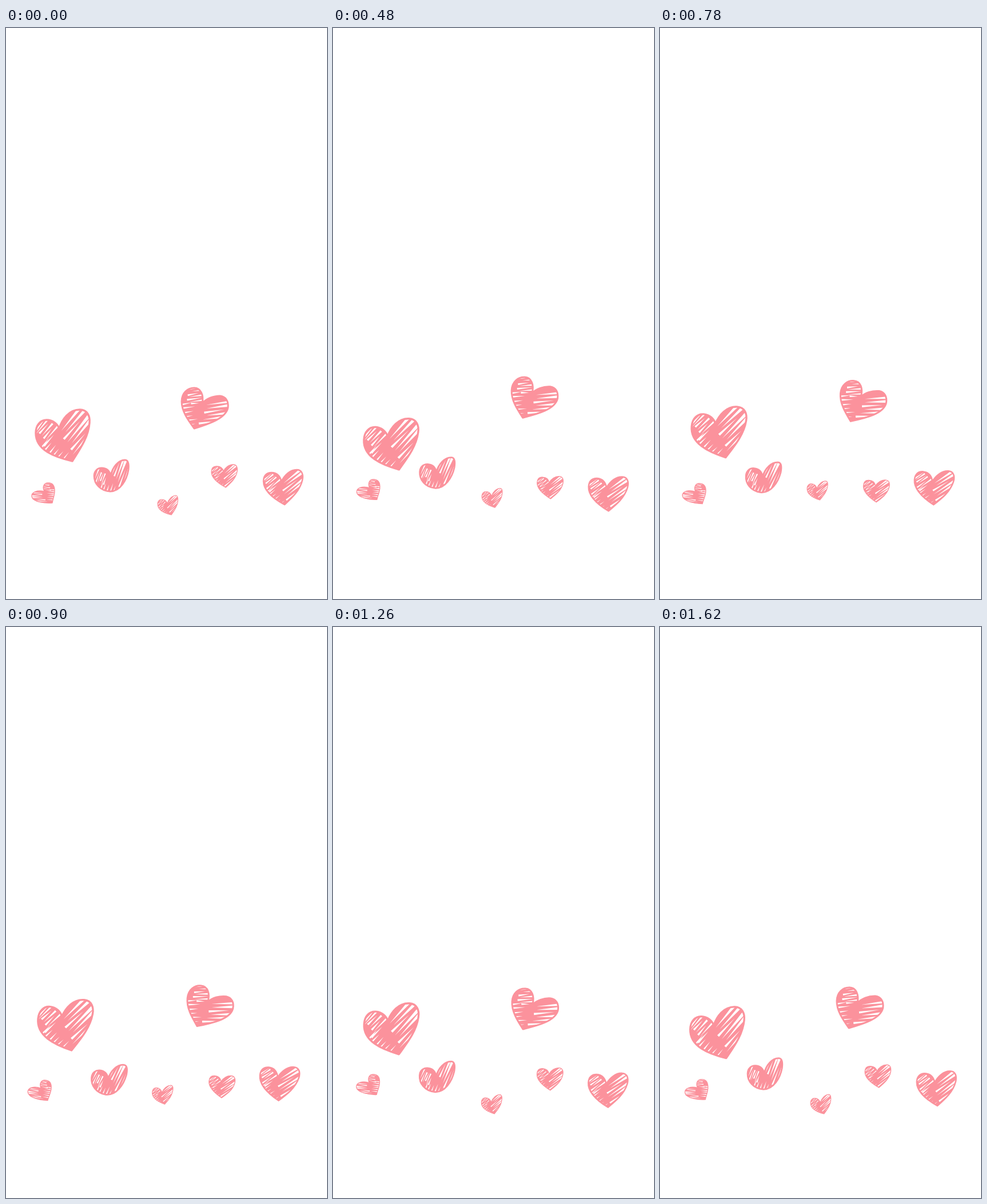
An HTML page with a canvas that plays this animation: 561x998 px, repeating every 1.65 s.

```html
<!DOCTYPE html>
<html lang="en">
<head>
<meta charset="utf-8">
<title>Floating hearts</title>
<style>
html, body { margin: 0; height: 100%; overflow: hidden; background: #fff; }
canvas { display: block; }
</style>
</head>
<body>
<canvas id="stage" width="561" height="998"></canvas>
<script>
const PINK = '#fb929c', LOOP = 1650, HALF = 25, TILT = 6 * Math.PI / 180;
const ctx = document.getElementById('stage').getContext('2d');

// hatch: stroke angle in degrees; drift: sideways travel; bob: [step, dy] corners over 50 steps
const hearts = [
  { x: 99, y: 711.5, r: 50, line: 3.4, hatch: -50, drift: 3.4,
    bob: [[0, 0], [12.5, 15.4], [25, -18.6], [50, 0]],
    d: 'M116 757C85 750 52 738 52 708C52 694 60 685 71 685C82 685 90 692 93 700C98 684 110 667 129 667C142 667 147 678 146 690C144 715 130 735 116 757Z' },
  { x: 347, y: 665, r: 44, line: 3, hatch: -8, drift: 8.6,
    bob: [[0, 0], [7.5, -6], [16, -24.1], [25, -.3], [27.6, 6.2], [50, 0]],
    d: 'M329 700C318 685 307 670 307 653C307 638 317 629 329 629C340 629 346 641 343 656C350 648 362 643 374 643C384 644 389 652 388 663C385 682 355 692 329 700Z' },
  { x: 184.5, y: 782, r: 34, line: 2.8, hatch: -70, drift: -4.5,
    bob: [[0, 0], [15, -6.5], [25, 7.7], [46, -2.4], [50, 0]],
    d: 'M182 810C165 809 154 797 154 783C154 774 160 769 167 769C176 769 181 774 183 782C186 768 196 755 208 755C214 755 215 763 214 772C211 790 200 810 182 810Z' },
  { x: 64.5, y: 812.5, r: 21, line: 1.4, hatch: 2, flip: true, drift: -6.3,
    bob: [[0, 0], [9.7, -9.3], [21, .2], [25, -4], [35, -13.6], [50, 0]],
    d: 'M81 830C70 831 47 829 45 819C44 811 55 807 67 810C63 802 66 795 74 795C82 795 85 801 85 809C85 817 82 823 81 830Z' },
  { x: 282.5, y: 834, r: 19.5, line: 1.2, hatch: -45, drift: -9.7,
    bob: [[0, 0], [7, .1], [20, -28.7], [25, -17.5], [32, -.6], [50, 0]],
    d: 'M289 851C276 848 265 842 265 832C265 827 268 824 272 824C278 824 280 827 282 831C284 824 290 817 297 817C301 818 301 823 300 829C299 838 293 845 289 851Z' },
  { x: 381.5, y: 783, r: 24.5, line: 1.4, hatch: -40, drift: -5,
    bob: [[0, 0], [7, 5.7], [17.6, 30.6], [25, 19.8], [36, 5.3], [50, 0]],
    d: 'M384 803C373 797 359 788 359 776C359 769 363 766 368 766C375 766 379 770 380 775C383 768 390 763 397 763C403 763 405 768 404 775C402 787 393 795 384 803Z' },
  { x: 484, y: 802.5, r: 37, line: 2.6, hatch: -38, drift: -7.4,
    bob: [[0, 0], [12.5, 11.8], [25, -5.4], [37.5, 9.3], [50, 0]],
    d: 'M487 833C470 824 450 810 450 792C450 782 456 777 464 777C474 777 480 784 481 793C487 781 497 772 508 772C517 772 520 780 518 790C514 808 500 821 487 833Z' }
];

function seeded(seed) {
  return () => (seed = seed * 16807 % 2147483647) / 2147483647;
}

// White gaps between pen strokes, in units of the heart's radius
function makeGaps(seed) {
  const rand = seeded(seed), gaps = new Path2D();
  const vary = amount => (rand() - .5) * amount;
  function gap(tip, base, v, width) {
    const slant = vary(.06);
    gaps.moveTo(tip, v);
    gaps.lineTo(base, v + slant - width / 2);
    gaps.lineTo(base, v + slant + width / 2);
    gaps.closePath();
  }
  for (let i = 0; i < 7; i++) {
    const v = -.13 + i * .14, inner = .12 - .6 * v + vary(.3);
    if (i % 3 === 2) gap(.85 - .5 * v, inner - .1, v, .08);
    else gap(inner, 1.2 - .4 * v, v, .12 + vary(.04));
  }
  for (let i = 0; i < 7; i++) {
    const v = -.84 + i * .1, a = -.5 + vary(.3), b = .1 + vary(.3);
    if (i % 2) gap(a, b, v, .07);
    else gap(b - .15, a - .1, v, .07);
  }
  for (let i = 0; i < 6; i++) gap(-.4 + vary(.2), -1, -.3 + i * .17, .09);
  return gaps;
}

hearts.forEach((heart, i) => {
  heart.outline = new Path2D(heart.d);
  heart.gaps = makeGaps(4127 * (i + 3));
});

function valueAt(corners, step) {
  const i = corners.findIndex(c => c[0] > step);
  const [s0, v0] = corners[i - 1], [s1, v1] = corners[i];
  return v0 + (v1 - v0) * (step - s0) / (s1 - s0);
}

// Five steps per 180 ms; the first is held twice as long
function stepAt(time) {
  return 5 * Math.floor(time / 180) + Math.max(0, Math.floor(time % 180 / 30) - 1);
}

function drawHeart(heart, step) {
  const swing = 1 - Math.abs(step - HALF) / HALF;
  ctx.save();
  ctx.translate(heart.x + heart.drift * swing, heart.y + valueAt(heart.bob, step));
  ctx.rotate(TILT * swing);
  ctx.save();
  ctx.translate(-heart.x, -heart.y);
  ctx.fill(heart.outline);
  ctx.clip(heart.outline);
  ctx.translate(heart.x, heart.y);
  ctx.rotate(heart.hatch * Math.PI / 180);
  ctx.scale(heart.flip ? -heart.r : heart.r, heart.r);
  ctx.fillStyle = '#fff';
  ctx.fill(heart.gaps);
  ctx.restore();
  ctx.translate(-heart.x, -heart.y);
  ctx.lineWidth = heart.line;
  ctx.stroke(heart.outline);
  ctx.restore();
}

function draw() {
  const step = stepAt(performance.now() % LOOP);
  ctx.fillStyle = '#fff';
  ctx.fillRect(0, 0, 561, 998);
  ctx.fillStyle = ctx.strokeStyle = PINK;
  ctx.lineJoin = 'round';
  hearts.forEach(heart => drawHeart(heart, step));
  requestAnimationFrame(draw);
}
draw();
</script>
</body>
</html>
```
